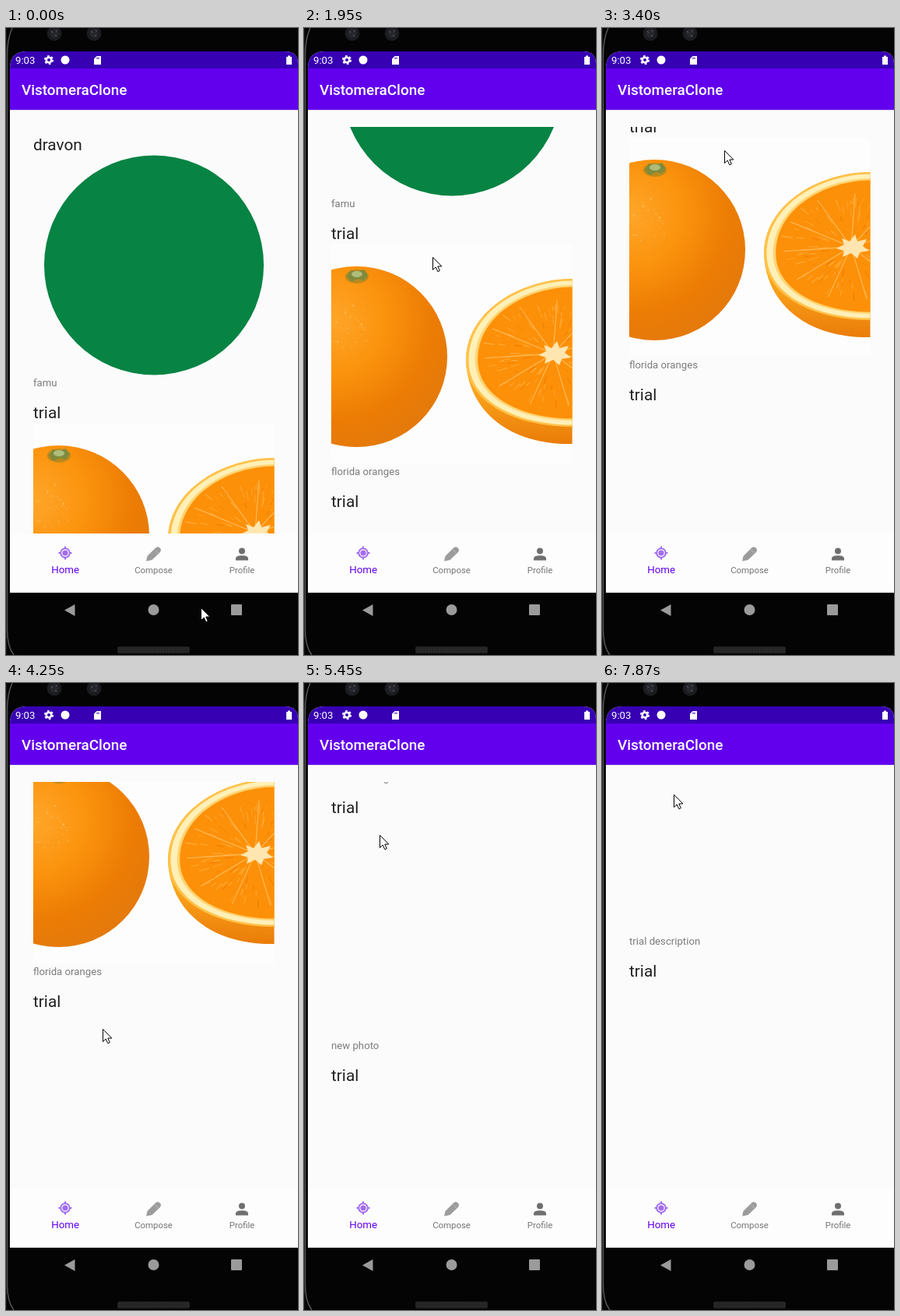
An HTML page for the animation above (8 s loop, 375x805 px).

```html
<!DOCTYPE html>
<html lang="en">
<head>
<meta charset="utf-8">
<title>Photo feed</title>
<style>
html, body { margin: 0; width: 100%; height: 100%; overflow: hidden; background: #000; }
svg { display: block; width: 375px; height: 805px; font-family: Roboto, sans-serif; }
.user { font-size: 20.8px; fill: #212121; }
.note { font-size: 13.2px; fill: #7b7b7b; }
.tab { font-size: 11.4px; fill: #757575; text-anchor: middle; }
.tab.on { font-size: 13.3px; fill: #6200ee; }
</style>
</head>
<body>
<svg viewBox="0 0 375 805">
  <defs>
    <clipPath id="list"><rect x="35" y="127" width="310" height="522"/></clipPath>
    <clipPath id="photo"><rect x="35" y="508" width="309.5" height="281"/></clipPath>
    <clipPath id="screen"><path d="M5 725V52Q5 30 27 30H358Q375 30 375 46V725Z"/></clipPath>
    <radialGradient id="peel" cx=".36" cy=".3" r=".74">
      <stop offset="0" stop-color="#ffa62a"/>
      <stop offset=".4" stop-color="#fb930d"/>
      <stop offset=".75" stop-color="#ec7c04"/>
      <stop offset="1" stop-color="#e47a0c"/>
    </radialGradient>
    <linearGradient id="skin" x2="0" y2="1">
      <stop offset=".6" stop-color="#ffad20"/>
      <stop offset="1" stop-color="#ea7c08"/>
    </linearGradient>
    <path id="face" d="M346 552C280 552 208 592 208 657C208 710 270 742 346 742Z"/>
  </defs>

  <!-- phone body -->
  <rect width="375" height="805" fill="#040404"/>
  <path d="M8 0Q1.500 14 1.500 36V772Q1.500 794 10 805" fill="none" stroke="#55555a" stroke-width="1.500"/>
  <path d="M0 0V805" stroke="#29292c" stroke-width="1"/>
  <g id="lenses"></g>
  <rect x="143" y="794" width="93" height="9" rx="2" fill="#222"/>
  <path d="M145 797H235M145 800H235" stroke="#363636" stroke-dasharray="2 1.500"/>

  <!-- app -->
  <g clip-path="url(#screen)">
    <rect y="30" width="375" height="695" fill="#fbfbfb"/>
    <rect y="649" width="375" height="76" fill="#fdfdfd"/>
    <rect y="720" width="375" height="5" fill="#fff"/>
    <rect y="30" width="375" height="22.500" fill="#3700b3"/>
    <rect y="52" width="375" height="53" fill="#6200ee"/>
    <rect y="105" width="375" height="1" fill="#dcd6e6"/>
  </g>
  <g fill="#fff">
    <text x="12" y="46" font-size="13.2">9:03</text>
    <circle cx="55" cy="41" r="3.300" fill="none" stroke="#fff" stroke-width="2.600"/>
    <circle cx="55" cy="41" r="5.200" fill="none" stroke="#fff" stroke-width="1.800" stroke-dasharray="2.720"/>
    <circle cx="76" cy="41" r="5.500"/>
    <path d="M113 39.500L116.500 36H122V47H113Z"/>
    <path d="M117 37.500V40M119 37.500V40" stroke="#3700b3"/>
    <path d="M360 37H362V35.500H365V37H367V47H360Z"/>
    <text x="20" y="86" font-size="18.9" font-weight="500">VistomeraClone</text>
  </g>

  <g clip-path="url(#list)">
    <g id="feed">
      <circle cx="190" cy="304.500" r="141" fill="#078343"/>
      <g clip-path="url(#photo)">
        <rect x="35" y="508" width="310" height="281" fill="#fdfdfd"/>
        <ellipse cx="67.500" cy="652" rx="116.500" ry="116" fill="url(#peel)"/>
        <g id="pores" fill="#ffc566"></g>
        <ellipse cx="68" cy="549" rx="15" ry="9" fill="#b98a1c"/>
        <path d="M55 549L60 541L68 543L77 540L82 547L77 554L69 552L61 556Z" fill="#7f8a3c"/>
        <ellipse cx="68" cy="546" rx="7" ry="4" fill="#aebc7c"/>
        <path d="M346 552C280 552 208 592 208 657C210 718 260 766 346 764Z" fill="url(#skin)"/>
        <use href="#face" fill="#ffc24a"/>
        <use href="#face" fill="#fff0b8" transform="translate(346 647) scale(.975) translate(-346 -647)"/>
        <use href="#face" fill="#ffd472" transform="translate(346 647) scale(.915) translate(-346 -647)"/>
        <use href="#face" fill="#fd9009" transform="translate(346 647) scale(.89) translate(-346 -647)"/>
        <g id="flesh" stroke-linecap="round"></g>
        <path d="M301 650L311 645L308 637L318 641L325 632L328 641L340 638L335 647L343 653L331 655L328 663L320 656L309 661L311 653Z" fill="#ffe6b0"/>
      </g>
    </g>
  </g>

  <!-- tabs -->
  <g fill="#a06cf2" stroke="#a06cf2">
    <circle cx="76" cy="674" r="5.800" fill="none" stroke-width="2"/>
    <circle cx="76" cy="674" r="3.600" stroke="none"/>
    <path d="M76 665.500V669M76 679V682.500M67.500 674H71M81 674H84.500" stroke-width="2"/>
  </g>
  <path d="M180 684.500L181.500 678L191.500 668Q194.500 665 197.500 667.500Q200.500 670 197.500 673.500L187.500 683Z" fill="#9c9c9c"/>
  <path d="M191 669.500L196.500 675" stroke="#c4c4c4" stroke-width=".7"/>
  <g fill="#6f6f6f">
    <circle cx="303" cy="671.500" r="4"/>
    <path d="M295 683.500V681Q295 677.500 303 677.300Q311 677.500 311 681V683.500Z"/>
  </g>
  <text class="tab on" x="76.200" y="700">Home</text>
  <text class="tab" x="189.500" y="700">Compose</text>
  <text class="tab" x="303" y="700">Profile</text>

  <!-- system keys -->
  <g fill="#9b9b9b">
    <path d="M75 747.500L88.500 740V755Z"/>
    <circle cx="189.500" cy="747" r="7"/>
    <rect x="289" y="740" width="14" height="14" rx="1"/>
  </g>

  <path id="cursor" d="M.5 .5V16.500L4.200 13L6.800 18.700L9.300 17.600L6.800 12H11.800Z" fill="#fff" stroke="#000" stroke-linejoin="round"/>
</svg>

<script>
const LOOP = 8000, STEP = 120, PITCH = 344;
const $ = id => document.getElementById(id);

let seed = 11;
const rand = (lo, hi) => {
  seed = (seed * 16807) % 2147483647;
  return lo + (hi - lo) * seed / 2147483647;
};
const add = (id, markup) => $(id).insertAdjacentHTML("beforeend", markup);

// posts
const posts = [
  ["dravon", "famu"],
  ["trial", "florida oranges"],
  ["trial", "new photo"],
  ["trial", "trial description"],
  ["trial", ""]
];
posts.forEach(([user, note], i) => add("feed",
  `<text class="user" x="35" y="${157 + i * PITCH}">${user}</text>
   <text class="note" x="35" y="${460 + i * PITCH}">${note}</text>`));

// camera lenses
for (const x of [62, 113]) add("lenses",
  `<circle cx="${x}" cy="7" r="9.500" fill="#1b1c20"/>
   <circle cx="${x}" cy="7" r="5.500" fill="#26272c"/>
   <path d="M${x - 4} 4l2 2M${x + 2} 3l2 1M${x + 1} 9l2 2" stroke="#66676d"/>`);

// orange texture
for (let i = 0; i < 45; i++) add("pores",
  `<circle cx="${rand(36, 80)}" cy="${rand(585, 645)}" r="${rand(.5, 1.3)}" opacity="${rand(.2, .7)}"/>`);

const ray = (angle, from, to, color, width) => {
  const at = r => `${320 + Math.cos(angle) * r * 1.18} ${648 + Math.sin(angle) * r * .92}`;
  add("flesh", `<path d="M${at(from)}L${at(to)}" stroke="${color}" stroke-width="${width}"/>`);
};
for (let i = 0; i < 120; i++) {
  const r = rand(20, 66);
  ray(rand(0, 2 * Math.PI), r, r + rand(4, 12), i % 3 ? "#ffac38" : "#f27d00", rand(.6, 1.4));
}
for (let i = 0; i < 11; i++) ray(i * 2 * Math.PI / 11 + .2, 8, 74, "#ffbd5c", 1.1);

// time, scroll, cursor x, cursor y
const keys = [
  [0, 0, 250, 744], [500, 0, 247, 715], [740, 0, 188, 533],
  [990, 25, 182, 503], [1350, 162, 169, 366], [1470, 185, 168, 342],
  [1950, 230, 165, 294], [2550, 311, 161, 213], [2790, 345, 159, 179],
  [3160, 355, 158, 169], [3400, 367, 157, 157], [3640, 367, 130, 509],
  [3890, 373, 128, 500], [4610, 485, 120, 388], [4850, 544, 117, 329],
  [5450, 678, 97, 195], [5570, 680, 97, 193], [5690, 680, 97, 193],
  [5930, 708, 109, 165], [6180, 732, 108, 141], [6540, 732, 99, 572],
  [6910, 755, 98, 544], [7150, 866, 97, 433], [7630, 1040, 94, 259],
  [7870, 1156, 92, 143]
];

// the picture updates in bursts: start, number of updates
const bursts = [[0, 1], [500, 3], [990, 16], [3160, 5], [3890, 18], [6180, 4], [6910, 9]];

function snap(t) {
  const [start, count] = bursts.findLast(b => b[0] <= t);
  return start + STEP * Math.min(Math.floor((t - start) / STEP), count - 1);
}

function pose(t) {
  const i = keys.findLastIndex(k => k[0] <= t);
  const a = keys[i], b = keys[i + 1] || a;
  const p = b === a ? 0 : (t - a[0]) / (b[0] - a[0]);
  return a.slice(1).map((v, n) => Math.round(v + (b[n + 1] - v) * p));
}

function draw() {
  const [scroll, x, y] = pose(snap(performance.now() % LOOP));
  $("feed").setAttribute("transform", `translate(0 ${-scroll})`);
  $("cursor").setAttribute("transform", `translate(${x} ${y})`);
  requestAnimationFrame(draw);
}
draw();
</script>
</body>
</html>
```
